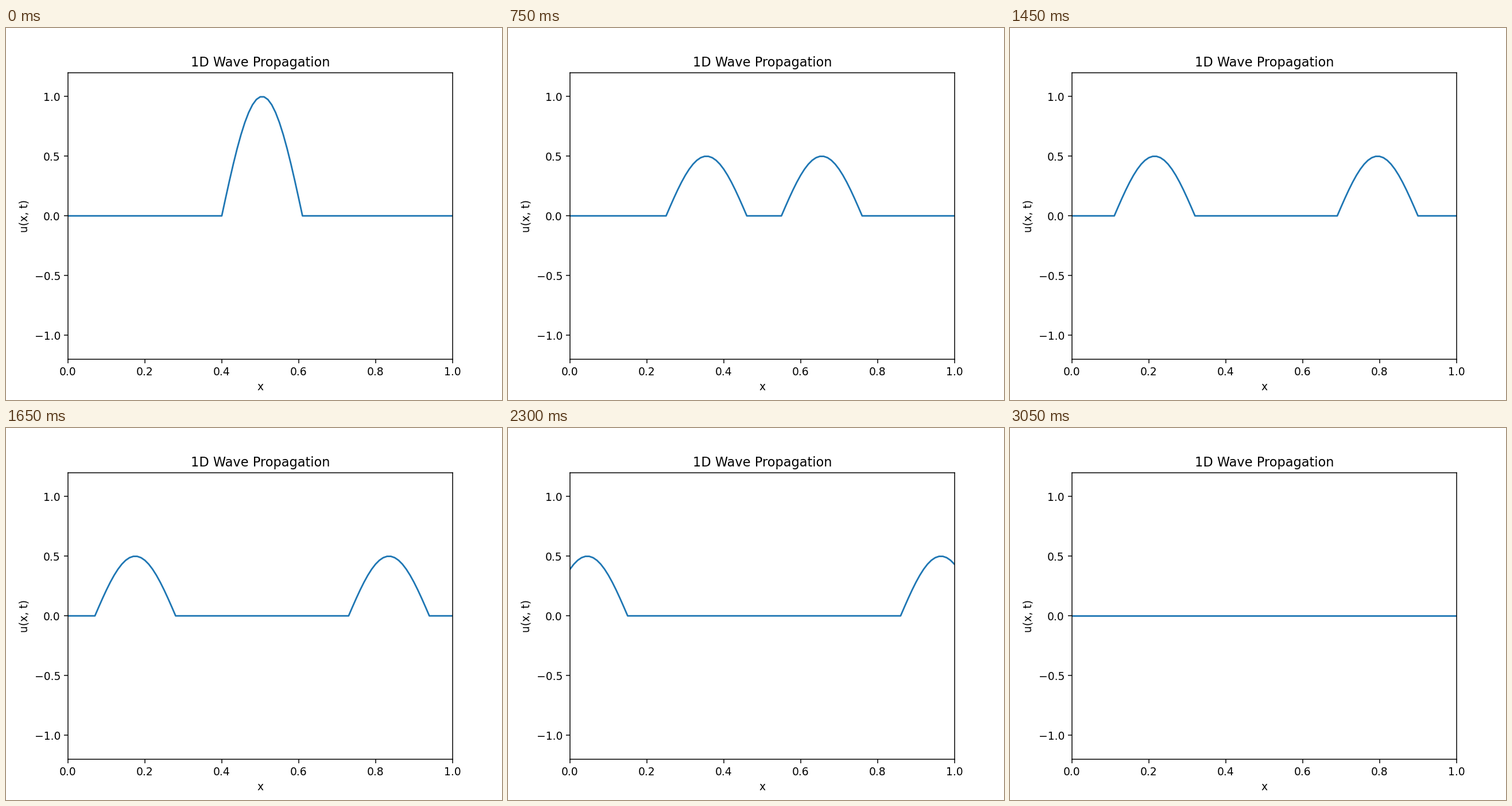
A matplotlib script for the animation above (8000 ms loop, 864 by 648 pixels).

```python
import numpy as np
import matplotlib.pyplot as plt
from matplotlib.animation import FuncAnimation

FRAMES = 160
INTERVAL = 50  # ms
CELLS = 100
START, WIDTH = 40, 21  # pulse position and width in grid cells

cells = np.arange(CELLS + 1)


def pulse(i):
    """Half-sine bump, zero outside its support."""
    inside = (i > START) & (i < START + WIDTH)
    return np.where(inside, np.sin(np.pi * (i - START) / WIDTH), 0.0)


def wave(step):
    """Two half-height pulses moving one cell per step and leaving at the ends."""
    return 0.5 * (pulse(cells + step) + pulse(cells - step))


fig, ax = plt.subplots(figsize=(6.4, 4.8), dpi=135)
line, = ax.plot(cells / CELLS, wave(0))
ax.set_xlim(0, 1)
ax.set_ylim(-1.2, 1.2)
ax.set_xlabel("x")
ax.set_ylabel("u(x, t)")
ax.set_title("1D Wave Propagation")


def update(step):
    line.set_ydata(wave(step))
    return line,


anim = FuncAnimation(fig, update, frames=FRAMES, interval=INTERVAL,
                     blit=True, repeat=True, repeat_delay=0)
plt.show()
```
